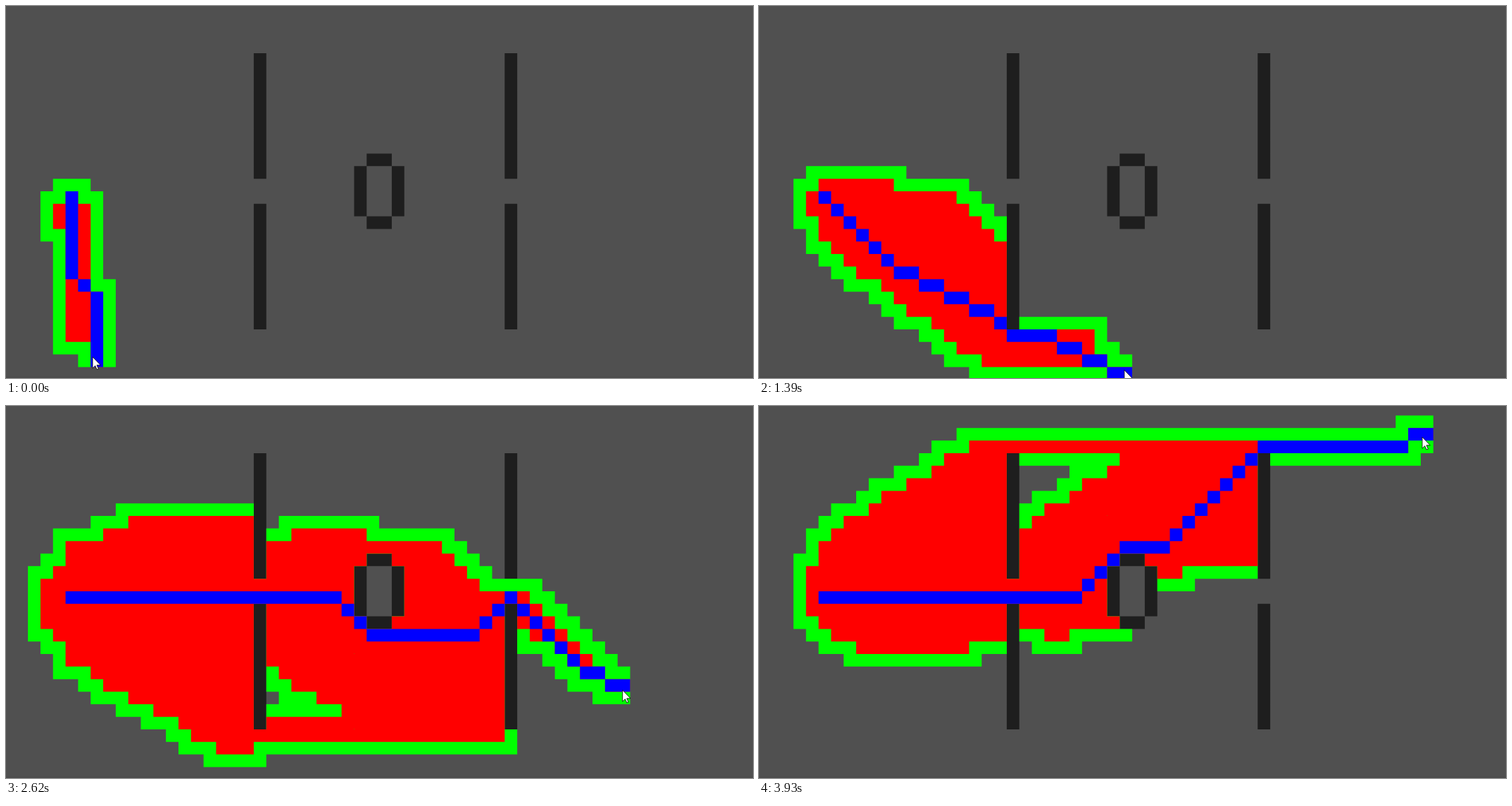
Animation, 1061 px wide and 528 px high, one loop 4310 ms. Source, as an HTML page:

```html
<!DOCTYPE html>
<html lang="en">
<head>
<meta charset="utf-8">
<title>A* search</title>
<style>
  html, body { margin: 0; width: 100%; height: 100%; overflow: hidden; background: #505050; }
  svg { display: block; width: 1061px; height: 528px; }
</style>
</head>
<body>
<svg viewBox="0 0 1061 528">
  <rect width="1061" height="528" fill="#505050"/>
  <rect y="526" width="1061" height="2" fill="#4b4b4b"/>
  <path id="walls" fill="#1e1e1e"/>
  <path id="seen" fill="#0f0"/>
  <path id="closed" fill="#f00"/>
  <path id="route" fill="#00f"/>
  <path id="cursor" d="M0 0V16.2L3.7 12.7 6.1 18 8.4 17 6 11.8H11.3Z" fill="#fff" stroke="#000" stroke-width=".8"/>
</svg>
<script>
const LOOP = 4310, STEP = LOOP / 56, LAST = 51;
const COLS = 60, ROWS = 31, START = { c: 5, r: 15 };
const CELL = 17.82, LEFT = -4.5, TOP = -4.35;

// Pointer path: step, x, y
const PATH = [
  [0, 123, 498], [11, 348, 514], [24, 671, 514], [29, 795, 496],
  [38, 925, 309], [43, 942, 148], [46, 942, 33], [51, 942, 44]
];

const $ = id => document.getElementById(id);
const between = (v, lo, hi) => v >= lo && v <= hi;
const key = (c, r) => r * COLS + c;
const inside = (c, r) => between(c, 0, COLS - 1) && between(r, 0, ROWS - 1);

// Two gated walls, and a ring without corners between them.
function isWall(c, r) {
  const gate = (c === 20 || c === 40) && between(r, 4, 25) && !between(r, 14, 15);
  const ring = between(c, 28, 31) && between(r, 12, 17) &&
    (c === 28 || c === 31) !== (r === 12 || r === 17);
  return gate || ring;
}

function paint(id, cells) {
  const box = ({ c, r }) =>
    `M${(LEFT + c * CELL).toFixed(2)} ${(TOP + r * CELL).toFixed(2)}h${CELL}v${CELL}h${-CELL}z`;
  $(id).setAttribute('d', cells.map(box).join(''));
}

// A* on eight neighbours; a diagonal may cut one wall corner but not pass between two.
function search(goal) {
  const nodes = new Map(), open = new Set(), closed = [];

  function reach(c, r, g, parent) {
    const id = key(c, r);
    let n = nodes.get(id);
    if (!n) {
      const dx = goal.c - c, dy = goal.r - r;
      n = { c, r, g: Infinity, h: Math.sqrt(dx * dx + dy * dy), done: false };
      nodes.set(id, n);
      open.add(n);
    }
    if (n.done || g >= n.g) return;
    n.g = g;
    n.f = g + n.h;
    n.parent = parent;
  }

  reach(START.c, START.r, 0, null);
  while (open.size) {
    let best = null;
    for (const n of open)
      if (!best || n.f < best.f || (n.f === best.f && n.h <= best.h)) best = n;
    open.delete(best);
    best.done = true;
    closed.push(best);
    const { c, r, g } = best;
    if (c === goal.c && r === goal.r) break;
    for (let dx = -1; dx <= 1; dx++)
      for (let dy = -1; dy <= 1; dy++) {
        const x = c + dx, y = r + dy;
        if ((!dx && !dy) || !inside(x, y) || isWall(x, y)) continue;
        if (dx && dy && isWall(x, r) && isWall(c, y)) continue;
        reach(x, y, g + (dx && dy ? Math.SQRT2 : 1), best);
      }
  }

  const route = [];
  for (let n = closed[closed.length - 1]; n; n = n.parent) route.push(n);
  return { seen: [...nodes.values()], closed, route };
}

// Smooth curve through the path points; axis 1 is x, axis 2 is y.
function pointer(step, axis) {
  const slope = i => {
    const a = PATH[Math.max(0, i - 1)], b = PATH[Math.min(PATH.length - 1, i + 1)];
    return (b[axis] - a[axis]) / (b[0] - a[0]);
  };
  const i = Math.max(1, PATH.findIndex(p => p[0] >= step));
  const a = PATH[i - 1], b = PATH[i], span = b[0] - a[0];
  const u = (step - a[0]) / span, v = 1 - u;
  return a[axis] * v * v * (1 + 2 * u) + b[axis] * u * u * (1 + 2 * v) +
    span * u * v * (slope(i - 1) * v - slope(i) * u);
}

let shown = -1;
function draw(t) {
  const step = Math.min(LAST, Math.floor((t + 8) / STEP));
  if (step === shown) return;
  shown = step;
  const x = pointer(step, 1), y = pointer(step, 2);
  const found = search({ c: Math.floor((x - LEFT) / CELL), r: Math.floor((y - TOP) / CELL) });
  for (const id in found) paint(id, found[id]);
  $('cursor').setAttribute('transform', `translate(${x.toFixed(1)} ${y.toFixed(1)})`);
}

const walls = [];
for (let r = 0; r < ROWS; r++)
  for (let c = 0; c < COLS; c++) if (isWall(c, r)) walls.push({ c, r });
paint('walls', walls);

const begin = performance.now();
function tick() {
  draw((performance.now() - begin) % LOOP);
  requestAnimationFrame(tick);
}
tick();
</script>
</body>
</html>
```
